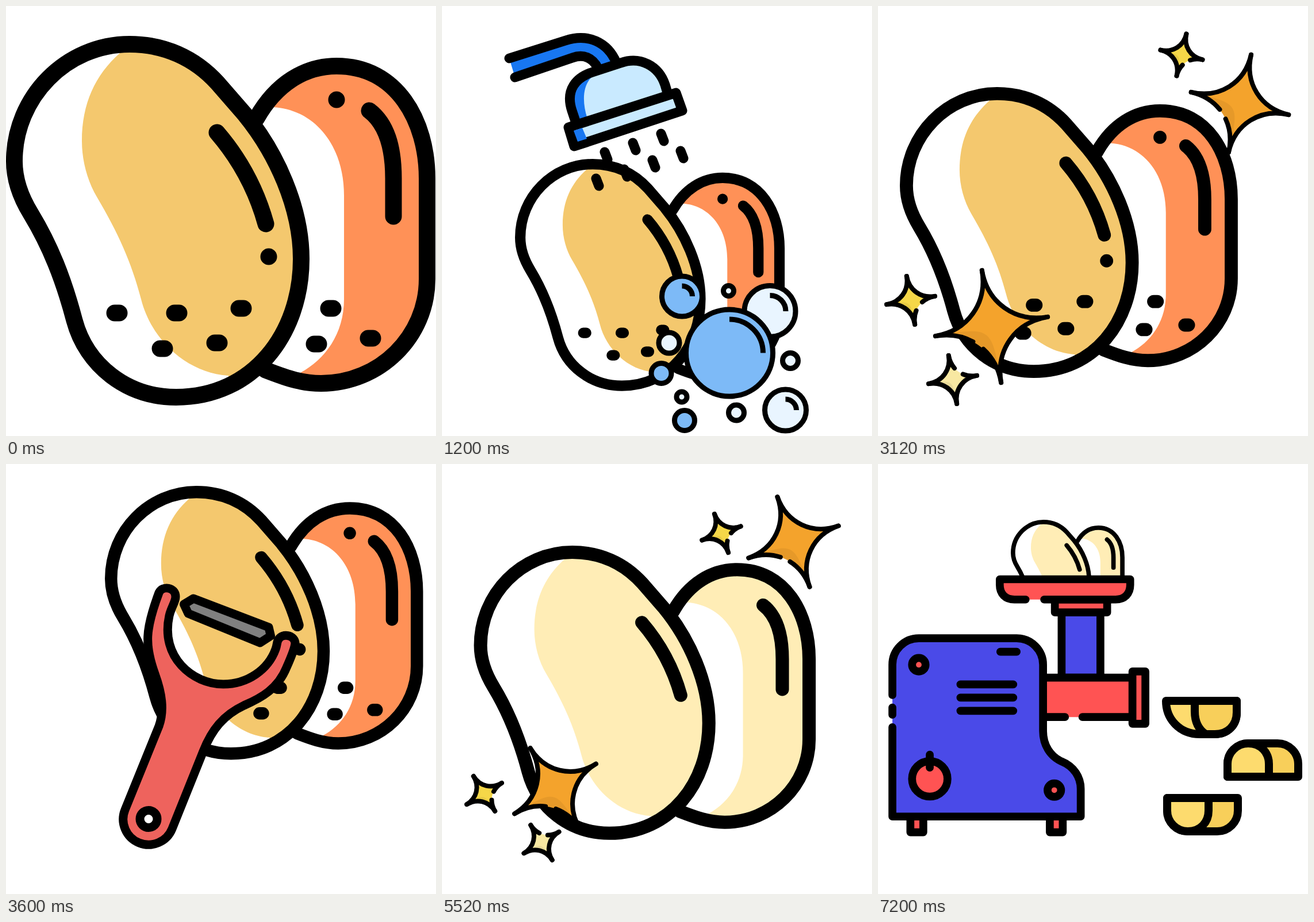
Write an HTML page that moves like this. It is 748 by 748 pixels and loops after 8 s.

```html
<!DOCTYPE html>
<html lang="en">
<head>
<meta charset="utf-8">
<title>Potato prep</title>
<style>
html, body { margin: 0; width: 100%; height: 100%; overflow: hidden; background: #fff; }
svg { display: block; width: 100%; height: 100%; }
.scene { visibility: hidden; }
.scene.on { visibility: visible; }
.ink { stroke: #000; stroke-linecap: round; stroke-linejoin: round; }
.line { fill: none; }
.flat { stroke: none; }
.raw { --front: #f4c86e; --back: #ff9157; --eyes: 1; }
.peeled { --front: #ffedb6; --back: #ffedb6; --eyes: 0; }
.front { fill: var(--front); }
.back { fill: var(--back); }
.eyes { opacity: var(--eyes); }
.shine { stroke-linecap: butt; }
.red { fill: #ff5353; }
.blue { fill: #4a4ae8; }
.pipe { fill: #1877f2; }
.steel { fill: #c9eaff; }
.light { fill: #fddb6e; }
.dark { fill: #f8cf5a; }
</style>
</head>
<body>
<svg viewBox="0 0 748 748" xmlns="http://www.w3.org/2000/svg">
  <defs>
    <path id="backShape" d="M436 195C470 135 520 104.500 575 104.500C680 104.500 732.500 200 732.500 300V475C732.500 575 650 656.500 548 656.500C512 656.500 482 645 451 633"/>
    <path id="frontShape" d="M215 66.500C275 66.500 328 90 368 134L415 188C470 255 513.500 350 513.500 440C513.500 570 430 680.500 296 680.500C210 680.500 140 625 119 547C100 475 77 417 43 361C24 330 14.500 300 14.500 270C14.500 158 105 66.500 215 66.500Z"/>
    <clipPath id="inBack"><use href="#backShape"/></clipPath>
    <clipPath id="inFront"><use href="#frontShape"/></clipPath>
    <clipPath id="aboveTray"><path d="M0 0H748V195H0Z"/></clipPath>

    <g id="potatoes" class="ink" stroke-width="29">
      <use href="#backShape" class="flat" fill="#fff"/>
      <path class="back flat" clip-path="url(#inBack)" d="M465 176C535 180 588 240 588 330V510C588 570 555 615 512 638V748H748V0H440Z"/>
      <use href="#backShape" class="line"/>
      <path class="line" d="M632 182C662 205 674 245 674 300V366"/>
      <path class="line eyes" d="M575 163h.01M561 526h8M536 588h8M630 578h8"/>
      <use href="#frontShape" class="flat" fill="#fff"/>
      <path class="front flat" clip-path="url(#inFront)" d="M198 82C155 120 132 170 132 235C132 270 142 305 158 332C195 395 218 445 235 510C252 578 312 638 387 643V748H748V0H198Z"/>
      <use href="#frontShape" class="line"/>
      <path class="line" d="M367 220C410 270 437 325 452 379"/>
      <path class="line eyes" d="M457 436h.01M189 534h8M293 534h8M405 526h8M363 586h8M268 596h8"/>
    </g>

    <g id="machine" class="ink" stroke-width="14">
      <path class="blue" d="M450 331V447H519V331"/>
      <path class="red" d="M438 308H531V331H438Z"/>
      <path class="red flat" d="M340 272H572V282C572 298 562 308 546 308H366C350 308 340 298 340 282Z"/>
      <path class="line" d="M386 308H366C350 308 340 298 340 282V272H572V282C572 298 562 308 546 308H419"/>
      <path class="red flat" d="M417 447H576V517H417Z"/>
      <path class="line" d="M417 447H576M417 517H456M487 517H576"/>
      <path class="red" d="M576 436H599V529H576ZM181 694H204V722H181ZM429 694H452V722H429Z"/>
      <path class="blue flat" d="M149 694V424A47 47 0 0 1 196 377H370A47 47 0 0 1 417 424V542C417 567 430 587 450 596C472 605 484 624 484 645V694Z"/>
      <path class="line" d="M149 478V424A47 47 0 0 1 196 377H370A47 47 0 0 1 417 424V542C417 567 430 587 450 596C472 605 484 624 484 645V694H149V535M149 500V513"/>
      <path class="line" d="M341 401H370M270 459h94M270 482.500h94M270 506h94"/>
      <circle class="red" cx="196" cy="424" r="12"/>
      <circle class="red" cx="437" cy="647" r="12"/>
      <circle class="red" cx="215.500" cy="627" r="31.500"/>
      <path class="line" d="M215.500 584V607"/>
    </g>

    <g id="wedge">
      <path class="dark" d="M0 58V36A36 36 0 0 1 36 0H87A36 36 0 0 1 123 36V58Z"/>
      <path class="light" d="M0 58V36A36 36 0 0 1 36 0C58 0 72 16 72 36V58Z"/>
    </g>
  </defs>

  <g class="scene">
    <use href="#potatoes" class="raw"/>
  </g>

  <g class="scene">
    <use href="#potatoes" class="raw" transform="translate(127 233.300) scale(.628)"/>
    <g class="ink" stroke-width="17">
      <path class="pipe flat" d="M117 91L215 60C254 47 288 63 302 97L271 108C262 89 246 82 227 90L127 124Z"/>
      <path class="line" d="M117 91L215 60C254 47 288 63 303 98M127 124L227 90C246 83 262 90 271 108"/>
      <path class="steel flat" d="M234 206L226 182C214 145 234 124 262 115L311 99C345 87 377 104 388 137L393 155Z"/>
      <path class="pipe flat" d="M234 206L226 182C214 145 234 124 262 115L264 121C246 133 242 163 253 196Z"/>
      <path class="line" d="M234 206L226 182C214 145 234 124 262 115L311 99C345 87 377 104 388 137L393 154"/>
      <path class="steel" d="M220 211L407 151L418 182L230 244Z"/>
      <path class="pipe flat" d="M229 217L244 212L252 231L236 236Z"/>
      <path class="line" id="drops"/>
    </g>
    <g class="ink" stroke-width="9" id="bubbles"></g>
  </g>

  <g class="scene">
    <use href="#potatoes" class="raw" transform="translate(38 100.100) scale(.787)"/>
    <g class="ink" stroke-width="8" id="washedStars"></g>
  </g>

  <g class="scene">
    <use href="#potatoes" class="raw" transform="translate(172 -.500) scale(.741)"/>
    <g class="ink" stroke-width="15">
      <path fill="#808080" d="M309.500 244L326 234L457 284L460.500 299L442 311L317 260Z"/>
      <path fill="#ee635d" d="M207 601.500L266 456C276 428 271 398 259 365C241 315 242 288 266 224C272 211 295 214 295 231C295 240 287 250 284 264C268 336 325 383 378 383C420 383 456 358 469 322C472 314 471 309 474 305C481 294 501 297 503 311C503 318 496 336 488 354C473 391 444 407 414 420C378 437 358 462 343 500L289 634.500A44 44 0 0 1 207 601.500Z"/>
      <circle cx="248" cy="617.500" r="15" fill="#fff"/>
    </g>
  </g>

  <g class="scene">
    <use href="#potatoes" class="peeled" transform="translate(55.500 100.600) scale(.796)"/>
    <g class="ink" stroke-width="8" id="peeledStars"></g>
  </g>

  <g class="scene">
    <use href="#potatoes" class="peeled" transform="translate(309 0) scale(.368)"/>
    <use href="#machine"/>
  </g>

  <g class="scene">
    <g clip-path="url(#aboveTray)">
      <use href="#potatoes" class="peeled" transform="translate(231 83.200) scale(.265)"/>
    </g>
    <use href="#machine" transform="translate(-120.700 -65.500) scale(.978)"/>
    <g class="ink" stroke-width="14">
      <path class="light" d="M501 412H624V432C624 455 608 470 586 470H560C525 470 501 444 501 412Z"/>
      <path class="dark" d="M551 412H624V432C624 455 608 470 586 470H570C558 462 551 448 551 430Z"/>
      <use href="#wedge" transform="translate(608 486)"/>
      <use href="#wedge" transform="translate(503 639) scale(1 -1)"/>
    </g>
  </g>
</svg>
<script>
const byId = id => document.getElementById(id);

// Two slanted rows of water drops
const row = (x, y, count) =>
  Array.from({ length: count }, (_, i) => `M${x + 49 * i} ${y - 16 * i}l5 13`).join('');
byId('drops').setAttribute('d', row(283, 254, 3) + row(268, 300, 4));

// Large bubbles get a shine, set in from the rim
function bubble(fill, x, y, r) {
  const s = r - 17;
  const shine = r > 30 ? `<path class="line shine" d="M${x} ${y - s}a${s} ${s} 0 0 1 ${s} ${s}"/>` : '';
  return `<circle cx="${x}" cy="${y}" r="${r}" fill="${fill}"/>${shine}`;
}
const foam = (...at) => bubble('#e9f5ff', ...at);
const sky = (...at) => bubble('#7dbaf7', ...at);
byId('bubbles').innerHTML =
  foam(570.5, 531, 44.5) + sky(500, 603.5, 75.5) + sky(417.5, 505, 35) + foam(597.5, 703, 36) +
  foam(395, 586, 18) + sky(381.5, 639, 17.5) + sky(422, 721, 17.5) +
  foam(417, 680, 9) + foam(498.5, 495.5, 9) + foam(512, 707.5, 13.5) + foam(606, 617, 13.5);

// A four-pointed star; the line of one side is broken by a gap
const GOLD = { fill: '#f4a32c', size: 1, gapSide: 2, gap: 14 };
const LEMON = { fill: '#f5d748', size: .43, gapSide: 1, gap: 27 };
const CREAM = { fill: '#f8e8a2', size: .43, gapSide: 0, gap: 27 };

function star(x, y, kind, radius, tilt) {
  const r = radius * kind.size;
  const tip = (i, k = 0) => [0, -r, 0, r].map((_, j, a) => a[(j + i) % 4] * (1 - k));
  const at = (i, k = 0) => { const [, b, , d] = tip(i, k), [a] = tip(i, k); return `${-a} ${i % 2 ? 0 : b}`; };
  const point = (i, k = 0) => {
    const angle = i * Math.PI / 2, d = r * (1 - k);
    return `${(d * Math.sin(angle)).toFixed(2)} ${(-d * Math.cos(angle)).toFixed(2)}`;
  };
  const curve = (i, j, k) => `C${point(i, k)} ${point(j, k)} ${point(j)}`;
  const sides = [0, 1, 2, 3];
  const rest = (100 - kind.gap) / 2;
  const dash = `pathLength="100" stroke-dasharray="${rest} ${kind.gap} ${rest} 0"`;
  return `<g transform="translate(${x} ${y}) rotate(${tilt})">
    <path class="flat" fill="${kind.fill}" d="M${point(0)}${sides.map(i => curve(i, i + 1, .58)).join('')}"/>
    <path class="flat" fill-opacity=".06" d="M${point(2)}${curve(2, 3, .58)}${curve(3, 2, 1)}"/>
    ${sides.map(i => `<path class="line" ${i === kind.gapSide ? dash : ''} d="M${point(i)}${curve(i, i + 1, .58)}"/>`).join('')}
  </g>`;
}
const cluster = (radius, tilt, ...stars) => stars.map(s => star(...s, radius, tilt)).join('');

byId('washedStars').innerHTML =
  cluster(87, 13, [629.5, 169.5, GOLD], [528, 85, LEMON]) +
  cluster(99, -9.7, [197.5, 557.5, GOLD], [57, 512, LEMON], [130, 650, CREAM]);
byId('peeledStars').innerHTML =
  cluster(83, -19.7, [611.5, 135.5, GOLD], [486, 120.5, LEMON]) +
  cluster(83, -31.5, [197, 565, GOLD], [73.5, 573.5, LEMON], [173, 658.5, CREAM]);

// Hard cuts; the loop end shortens the last scene
const LOOP = 8000, HOLD = 1200;
const scenes = document.querySelectorAll('.scene');
const start = performance.now();
function tick() {
  const now = Math.floor((performance.now() - start) % LOOP / HOLD);
  scenes.forEach((s, i) => s.classList.toggle('on', i === now));
  requestAnimationFrame(tick);
}
tick();
</script>
</body>
</html>
```
